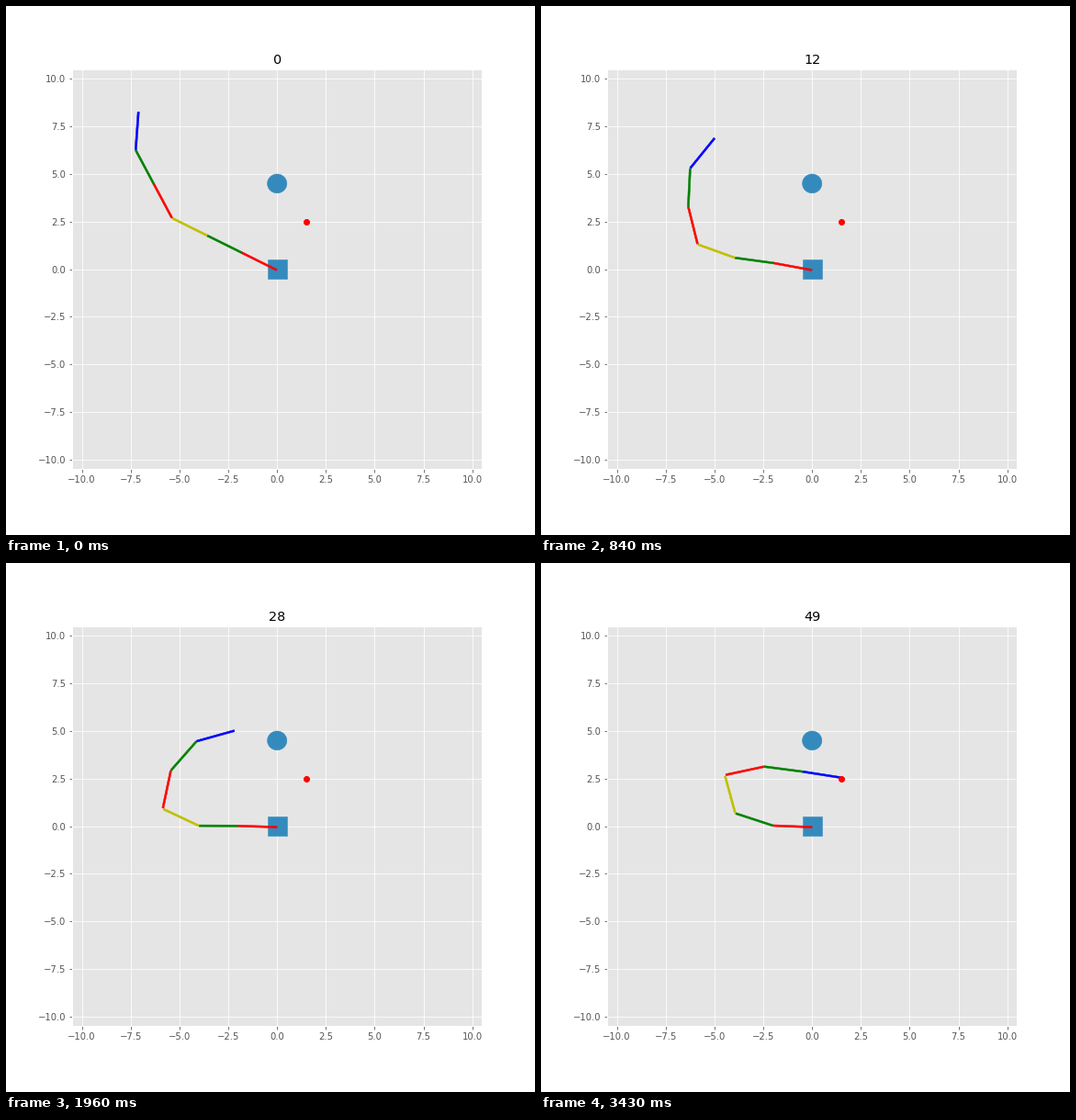
A matplotlib script for the animation above (3.5 s loop, 576x576 px).

```python
import numpy as np
import matplotlib.pyplot as plt
from matplotlib.animation import FuncAnimation
from matplotlib.patches import Circle, Rectangle

FRAMES, INTERVAL = 50, 70
LAST = FRAMES - 1
LINK, THICKNESS = 2.0, 0.1
COLORS = "rgyrgb"
BLUE = "#348ABD"
GOAL = np.array([1.5, 2.5])

# A few key poses: absolute link angles in degrees, base to tip.
KEY_STEPS = np.array([0, 16, 35, 43, LAST], float)
KEY_POSES = np.radians([
    [153, 153, 153, 117.5, 117.5, 86],
    [173, 176, 160, 98.5, 78, 42],
    [180, 179.5, 149, 67.5, 35.5, 3.5],
    [180, 176.5, 136, 46.5, 16, -9],
    [177.5, 161.5, 106, 13, -7.5, -9],
])
SLOPES = np.gradient(KEY_POSES, KEY_STEPS, axis=0, edge_order=2)


def joints(theta):
    offsets = LINK * np.column_stack([np.cos(theta), np.sin(theta)])
    return np.vstack([[0, 0], np.cumsum(offsets, axis=0)])


START = joints(KEY_POSES[0])[-1]


def tip_path(step):
    """Straight line to the goal, held back in x while passing the circle."""
    point = START + (GOAL - START) * step / LAST
    t = max(0, (step - 27) / (LAST - 27))
    return point - [4.5 * t * t * (1 - t), 0]


def blended_pose(step):
    """Cubic Hermite blend of the key poses."""
    i = min(np.searchsorted(KEY_STEPS, step, side="right"), len(KEY_STEPS) - 1) - 1
    span = KEY_STEPS[i + 1] - KEY_STEPS[i]
    t = (step - KEY_STEPS[i]) / span
    ease = t * t * (3 - 2 * t)
    return (KEY_POSES[i] * (1 - ease) + KEY_POSES[i + 1] * ease
            + span * t * (1 - t) * (SLOPES[i] * (1 - t) - SLOPES[i + 1] * t))


def arm_pose(step):
    """Adjust the blended pose so that the tip lies on its path."""
    theta = blended_pose(step)
    for _ in range(3):
        error = tip_path(step) - joints(theta)[-1]
        jacobian = LINK * np.vstack([-np.sin(theta), np.cos(theta)])
        theta = theta + np.linalg.pinv(jacobian) @ error
    return theta


plt.style.use("ggplot")
plt.rcParams["font.family"] = "DejaVu Sans"
fig, ax = plt.subplots(figsize=(8, 8), dpi=72)
fig.subplots_adjust(left=0.125, right=0.9, bottom=0.125, top=0.88)
ax.set(xlim=(-10.5, 10.5), ylim=(-10.5, 10.5))
ticks = np.arange(-10, 10.1, 2.5)
ax.set_xticks(ticks)
ax.set_yticks(ticks)

ax.add_patch(Circle((0, 4.5), 0.5, color=BLUE))
ax.add_patch(Rectangle((-0.5, -0.5), 1, 1, color=BLUE))
links = [ax.add_patch(Rectangle((0, 0), LINK, THICKNESS, color=c)) for c in COLORS]
ax.plot(*GOAL, "ro", ms=6)
title = ax.set_title("0", color="black")


def update(step):
    theta = arm_pose(step)
    for link, joint, angle in zip(links, joints(theta), np.degrees(theta)):
        link.set_xy(joint)
        link.set_angle(angle)
    title.set_text(str(step))
    return [*links, title]


anim = FuncAnimation(fig, update, frames=FRAMES, interval=INTERVAL,
                     repeat=True, repeat_delay=0, blit=False)
plt.show()
```
